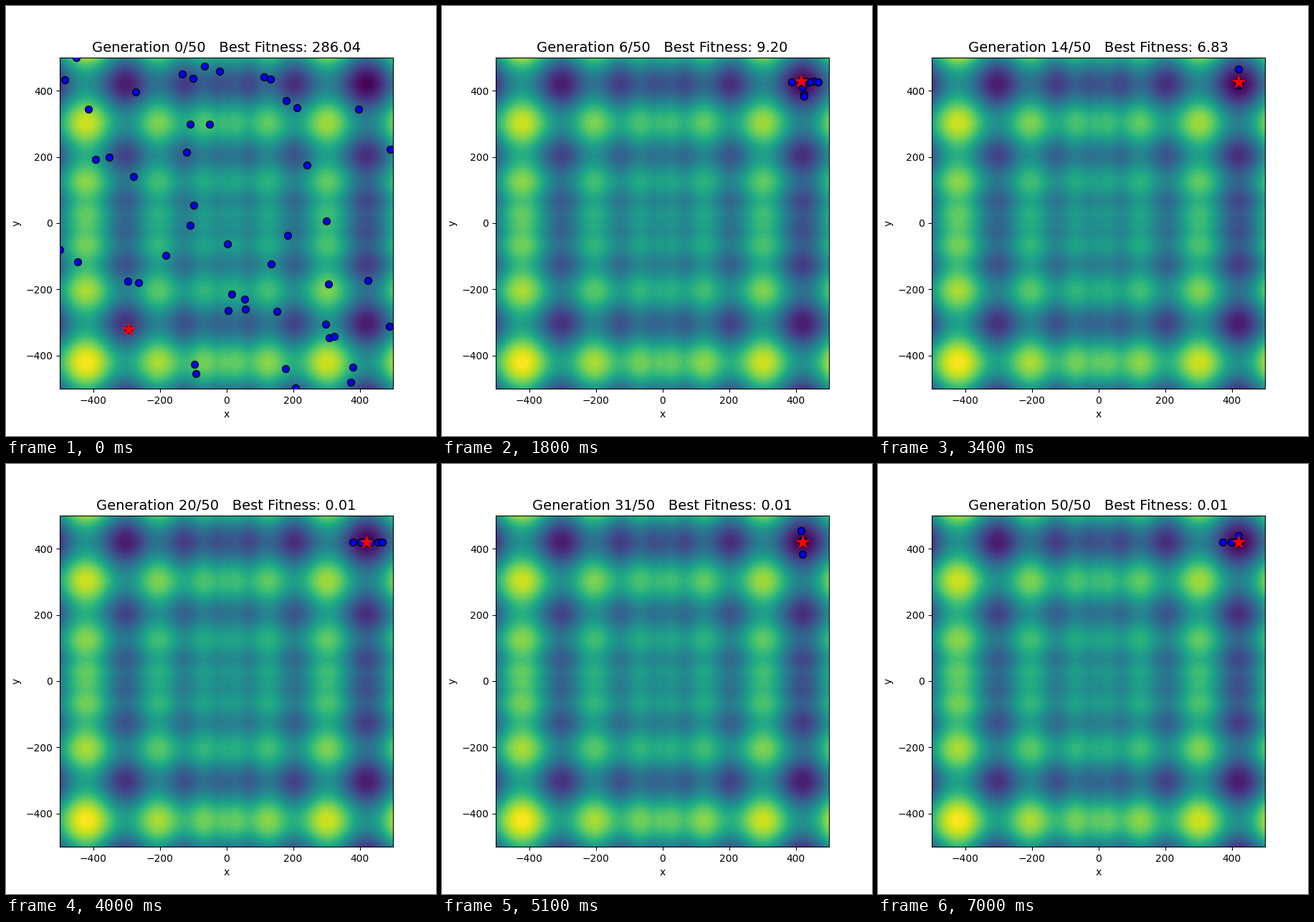
These frames come from a looping animation (600 by 600 pixels, 7.1 s). A matplotlib script:

```python
import numpy as np
import matplotlib.pyplot as plt
from matplotlib.animation import FuncAnimation

SIZE, GENERATIONS = 50, 50
LIMIT = 500
TOURNAMENT, MUTATION, STEP = 5, 0.045, 50
SLOW = 10          # the first generations stay three times as long
FRAMES, INTERVAL = 71, 100

# first generation, x, y, fitness of each new best individual
RECORDS = [
    (0, -294, -320, 286.04), (1, 440, 428.4, 52.81), (2, 414, 428.4, 13.02),
    (4, 416.6, 428.4, 9.20), (12, 421, 427.4, 6.83), (17, 420.9, 420.9, 0.01),
]


def schwefel(x, y):
    return 2 * 418.9829 - x * np.sin(np.sqrt(abs(x))) - y * np.sin(np.sqrt(abs(y)))


def best_at(gen):
    return [r for r in RECORDS if r[0] <= gen][-1][1:]


def scatter_start(rng):
    """Uniform random individuals, none of them better than the first best."""
    x, y, fitness = best_at(0)
    pop = rng.uniform(-LIMIT, LIMIT, (2 * SIZE, 2))
    pop = pop[schwefel(*pop.T) > fitness][:SIZE]
    pop[0] = x, y
    return pop


def breed(pop, best, rng):
    """Tournament selection, coordinate crossover and rare mutation."""
    cost = schwefel(*pop.T)

    def pick():
        group = rng.integers(0, SIZE, TOURNAMENT)
        return pop[group[np.argmin(cost[group])]]

    kids = np.array([(pick()[0], pick()[1]) for _ in pop])
    mutated = rng.random(kids.shape) < MUTATION
    kids += mutated * rng.uniform(-STEP, STEP, kids.shape)
    kids[0] = best
    return kids.clip(-LIMIT, LIMIT)


def evolve():
    rng = np.random.default_rng(5)
    pops = [scatter_start(rng)]
    for gen in range(1, GENERATIONS + 1):
        pops.append(breed(pops[-1], best_at(gen)[:2], rng))
    return pops


POPS = evolve()

fig, ax = plt.subplots(figsize=(6, 6), dpi=100)
axis = np.linspace(-LIMIT, LIMIT, 200)
X, Y = np.meshgrid(axis, axis)
ax.contourf(X, Y, schwefel(X, Y), levels=50, cmap="viridis")
ax.set(xlim=(-LIMIT, LIMIT), ylim=(-LIMIT, LIMIT), xlabel="x", ylabel="y")
dots = ax.scatter([], [], s=50, c="blue", edgecolors="black", zorder=3)
star = ax.scatter([], [], s=150, c="red", marker="*", zorder=4)
title = ax.set_title("", fontsize=14)


def update(i):
    gen = i // 3 if i < 3 * SLOW else i - 2 * SLOW
    x, y, fitness = best_at(gen)
    dots.set_offsets(POPS[gen])
    star.set_offsets([(x, y)])
    title.set_text(f"Generation {gen}/{GENERATIONS}   Best Fitness: {fitness:.2f}")
    return dots, star, title


anim = FuncAnimation(fig, update, frames=FRAMES, interval=INTERVAL,
                     repeat=True, repeat_delay=0)
plt.show()
```
